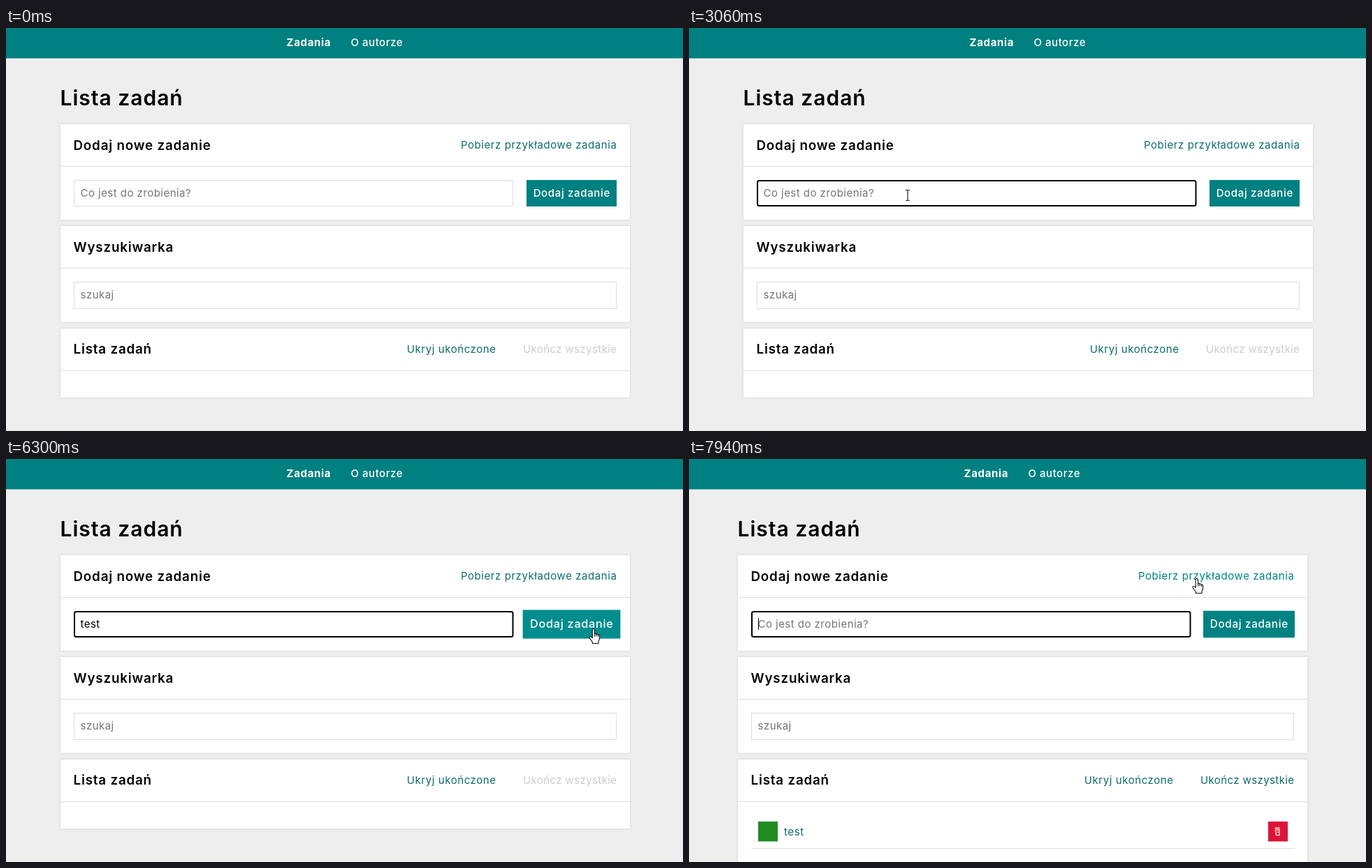
Animation, 969 px wide and 578 px high, one loop 8000 ms. Source, as an HTML page:

```html
<!DOCTYPE html>
<html lang="pl">
<head>
<meta charset="utf-8">
<title>Lista zadań</title>
<style>
  html, body { margin: 0; width: 100%; height: 100%; overflow: hidden; background: #eee; }
  svg { display: block; width: 969px; height: 578px; }
  text { font: 400 15px Inter, "Open Sans", sans-serif; letter-spacing: .035em; white-space: pre; }
  .title { font-size: 30px; font-weight: 600; letter-spacing: .033em; }
  .head { font-size: 18.8px; font-weight: 600; letter-spacing: .043em; }
  .nav { fill: #fff; font-weight: 500; }
  .active { font-weight: 700; letter-spacing: .045em; }
  .hint { fill: #757575; letter-spacing: .031em; }
  .link { fill: #0d6c6c; letter-spacing: .038em; }
  .end { text-anchor: end; }
  .label { fill: #fff; font-weight: 500; text-anchor: middle; letter-spacing: .044em; }
  .card { fill: #fff; filter: drop-shadow(0 0 1.5px #ccc); }
  .line { stroke: #ddd; fill: none; }
  .box { stroke: #ddd; fill: #fff; }
</style>
</head>
<body>
<svg viewBox="0 0 969 578">
  <rect width="969" height="578" fill="#eee"/>
  <rect width="969" height="43.5" fill="#008080"/>
  <g id="page">
    <text class="nav active" x="401.5" y="25.5">Zadania</text>
    <text class="nav" x="493.5" y="25.5">O autorze</text>
    <text class="title" x="77.5" y="111">Lista zadań</text>

    <rect class="card" x="78" y="138" width="815" height="137"/>
    <path class="line" d="M78 198.5H893"/>
    <text class="head" x="96.5" y="174.5">Dodaj nowe zadanie</text>
    <text class="link end" id="fetch" x="874.5" y="172.5">Pobierz przykładowe zadania</text>
    <rect class="box" x="97.5" y="218.5" width="628" height="37"/>
    <text class="hint" id="hint" x="106.5" y="242">Co jest do zrobienia?</text>
    <text class="hint" id="typed" x="106.5" y="242" style="fill:#000"></text>
    <rect id="ring" x="98" y="219" width="627.5" height="36" rx="2.5" fill="none" stroke="#000" stroke-width="2"/>
    <rect id="caret" y="228" width="1" height="17"/>
    <g id="button">
      <rect id="face" x="745" y="218" width="129" height="38"/>
      <text class="label" x="809.8" y="242">Dodaj zadanie</text>
    </g>

    <rect class="card" x="78" y="284" width="815" height="137.5"/>
    <path class="line" d="M78 344.5H893"/>
    <text class="head" x="96.5" y="320.5">Wyszukiwarka</text>
    <rect class="box" x="97.5" y="364.5" width="776" height="38"/>
    <text class="hint" x="106.5" y="388">szukaj</text>

    <rect class="card" id="list" x="78" y="431" width="815" height="99"/>
    <path class="line" d="M78 491.5H893"/>
    <text class="head" x="96.5" y="467">Lista zadań</text>
    <text class="link end" id="hide" x="701.5" y="465.5">Ukryj ukończone</text>
    <text class="link end" id="all" x="874.5" y="465.5" style="letter-spacing:.027em">Ukończ wszystkie</text>
    <g id="task">
      <rect x="107" y="520" width="28" height="28.5" fill="#228b22"/>
      <text class="link" x="144" y="539.5">test</text>
      <rect x="837" y="520" width="28" height="28.5" fill="#dc143c"/>
      <path d="M846.5 529.2L853.5 528.6M847.3 530.8H853V539.5H848.5L847.3 530.8M849.5 533H851.5M849.8 535.5H851.5" fill="none" stroke="#ffe9c4" stroke-width="1.3"/>
      <path class="line" d="M97 558.5H874"/>
    </g>
  </g>
  <circle id="click" r="11.3" fill="#ff6" opacity=".9"/>
  <g id="cursor">
    <path id="arrow" d="M0 0V16.5L3.8 13L6.4 19L8.8 18L6.2 12H11.5Z" fill="#fff" stroke="#000"/>
    <path id="beam" d="M-3 -7.5H-1L0 -6.8L1 -7.5H3M0 -7V7M-3 7.5H-1L0 6.8L1 7.5H3" fill="none" stroke="#222" stroke-width="1.2"/>
    <g id="hand" stroke="#111" stroke-width="1.1" stroke-linejoin="round">
      <path d="M-1.7 1.6Q0 -.6 1.6 1.6V7.6Q3 6.9 4 8.2Q5.6 7.6 6.5 9Q8.6 8.7 8.6 11V15L7 18.5V21.5H-1.7V19.5L-5.8 13.6Q-6.3 10.6 -3.6 11.8L-1.7 13.6Z" fill="#fff"/>
      <path d="M1.6 7.6V11.5M4 8.2V11.5M6.5 9V12" fill="none"/>
    </g>
  </g>
</svg>
<script>
const LOOP = 8000, STEP = 70, SUBMIT = 6770;
const $ = id => document.getElementById(id);
const show = (id, on) => $(id).setAttribute('display', on ? 'inline' : 'none');
const clamp = v => Math.max(0, Math.min(1, v));
const mix = (a, b, k) => a + (b - a) * k;
const easeOut = u => 1 - (1 - clamp(u)) ** 2.3;
const rgb = (a, b, k) => `rgb(${a.map((v, i) => Math.round(mix(v, b[i], k)))})`;

// Pointer moves: [time, x, y]
const moves = [
  [[690, 866, 560], [1040, 559, 378], [1250, 422, 303], [1460, 327, 251], [1600, 317, 243], [1740, 313, 240]],
  [[5400, 313, 240], [5610, 418, 259], [5820, 610, 271], [6030, 756, 255], [6240, 841, 243]],
  [[7590, 841, 243], [7940, 727, 171]]
];
const keys = [[3790, 113], [4010, 122], [4260, 130], [4590, 136]];
const blinks = [2540, 3060, 3590, 5140, 5670, 6200, SUBMIT, 7330, 7860];
const clicks = [[2400, 2540], [6640, SUBMIT]];
const fields = [[97, 218, 726, 256], [97, 364, 874, 403]];
const targets = [[745, 218, 874, 256], [650, 158, 874, 178], [572, 450, 701, 472]];

function pointer(t) {
  const path = moves.filter(m => t >= m[0][0]).pop();
  if (!path) return null;
  const start = path[0][0];
  const q = start + Math.floor((t - start) / STEP) * STEP;
  const i = path.findIndex(p => p[0] > q);
  if (i < 0) return path[path.length - 1].slice(1);
  const a = path[i - 1], b = path[i], k = (q - a[0]) / (b[0] - a[0]);
  return [mix(a[1], b[1], k), mix(a[2], b[2], k)];
}

// Hover amount that eases in at `on` and back out at `off`
function hover(t, on, off, span) {
  if (t < on) return 0;
  const peak = easeOut((Math.min(t, off) - on) / span);
  return t < off ? peak : peak * (1 - easeOut((t - off) / span));
}

function draw(t) {
  const done = t >= SUBMIT, shift = done ? -8 : 0;
  $('page').setAttribute('transform', `translate(${shift} 0)`);
  show('task', done);
  $('list').setAttribute('height', done ? 180 : 99);

  const typed = done ? 0 : keys.filter(k => t >= k[0]).length;
  $('typed').textContent = 'test'.slice(0, typed);
  show('hint', !typed);
  show('ring', t >= 2540);
  show('caret', blinks.filter(b => t >= b).length % 2);
  $('caret').setAttribute('x', typed ? keys[typed - 1][1] : 107);

  const grow = hover(t, 6030, 7660, 500), size = 1 + grow * .1;
  $('button').setAttribute('transform', `translate(809.5 237) scale(${size}) translate(-809.5 -237)`);
  $('face').setAttribute('fill', rgb([0, 128, 128], [0, 143, 143], grow));

  const ink = [13, 108, 108], lit = [0, 132, 132];
  $('hide').style.fill = rgb(ink, lit, hover(t, 830, 1020, 300));
  $('fetch').style.fill = rgb(ink, lit, hover(t, 7800, LOOP, 200));
  $('all').style.fill = done ? rgb(ink, ink, 0) : '#ccc';

  const pos = pointer(t);
  show('cursor', pos);
  show('click', clicks.some(c => t >= c[0] && t < c[1]));
  if (!pos) return;
  const [x, y] = pos;
  const over = r => x - shift >= r[0] && x - shift <= r[2] && y >= r[1] && y <= r[3];
  const kind = fields.some(over) ? 'beam' : targets.some(over) ? 'hand' : 'arrow';
  for (const id of ['arrow', 'beam', 'hand']) show(id, id === kind);
  $('cursor').setAttribute('transform', `translate(${x} ${y})`);
  $('click').setAttribute('cx', x - 2);
  $('click').setAttribute('cy', y);
}

function frame() {
  draw(performance.now() % LOOP);
  requestAnimationFrame(frame);
}
frame();
</script>
</body>
</html>
```
